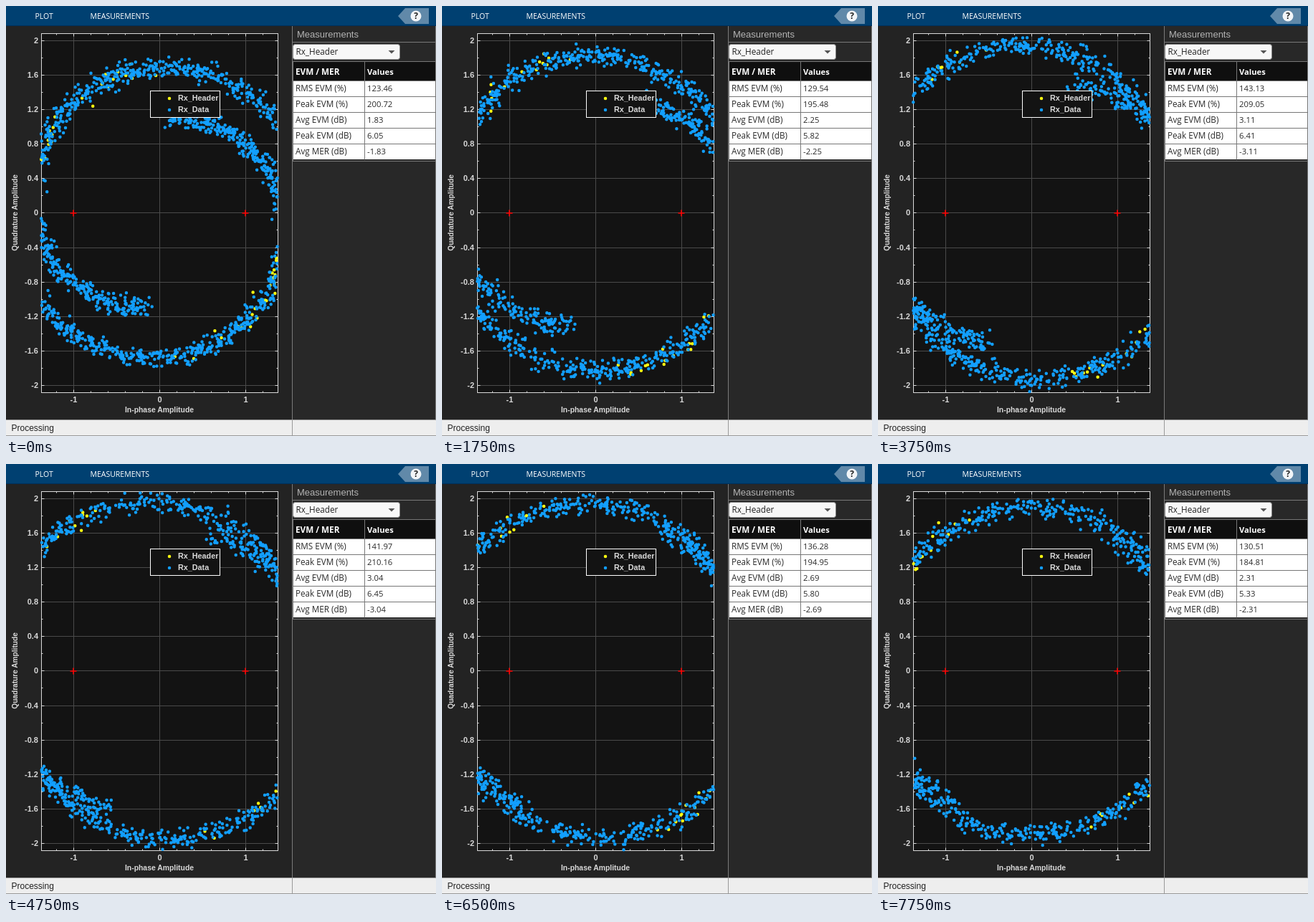
Animation, 600 px wide and 600 px high, one loop 8 s. Source, as an HTML page:

```html
<!DOCTYPE html>
<html lang="en">
<head>
<meta charset="utf-8">
<title>Constellation diagram</title>
<style>
  html, body { margin: 0; width: 100%; height: 100%; overflow: hidden; background: #232323; }
  svg { display: block; width: 100vw; height: 100vh; }
  .ui { font-family: "Open Sans", "Noto Sans", sans-serif; font-size: 11.7px; }
  .axis { font: bold 11px "Liberation Sans", Arial, sans-serif; fill: #d9d9d9; }
  .plain { font-family: "Liberation Sans", Arial, sans-serif; }
  .dots { fill: none; stroke-width: 4.5; stroke-linecap: round; }
</style>
</head>
<body>
<svg viewBox="0 0 600 600" xmlns="http://www.w3.org/2000/svg">
  <rect width="600" height="600" fill="#232323"/>

  <g class="ui" fill="#fff" style="font-size:10.5px">
    <rect width="600" height="28" fill="#004071"/>
    <path d="M0 27.5H600" stroke="#00305a"/>
    <text x="40.5" y="18">PLOT</text>
    <text x="117.5" y="18">MEASUREMENTS</text>
    <path d="M547 14L557 3H590V25H557Z" fill="#6189a9"/>
    <circle cx="572" cy="14" r="7.5" fill="#f2f5f8"/>
    <text x="572" y="18.3" text-anchor="middle" fill="#222" style="font-size:12px;font-weight:bold">?</text>
  </g>

  <rect x="49.5" y="38.5" width="330" height="501" fill="#131313"/>
  <path id="grid" stroke="#4a4a4a" fill="none"/>
  <path id="ticks" stroke="#d9d9d9" fill="none"/>
  <rect x="49.5" y="38.5" width="330" height="501" fill="none" stroke="#d9d9d9"/>
  <g id="labels" class="axis"></g>
  <g class="axis">
    <text x="214" y="567" text-anchor="middle" style="font-size:10.4px">In-phase Amplitude</text>
    <text transform="translate(16 288.5) rotate(-90)" text-anchor="middle" style="font-size:10.15px">Quadrature Amplitude</text>
  </g>
  <path id="head" class="dots" stroke="#ffff11"/>
  <path id="data" class="dots" stroke="#129fff"/>
  <path d="M89.5 289H98.5M94 284.5V293.5M329.5 289H338.5M334 284.5V293.5" stroke="#f00" stroke-width="1.6"/>
  <rect x="201.5" y="118.5" width="97" height="37" fill="#131313" stroke="#fff"/>
  <path class="dots" stroke="#ffff11" d="M228 129h0"/>
  <path class="dots" stroke="#129fff" d="M228 145h0"/>
  <g class="axis" style="font-size:10.8px">
    <text x="240" y="132">Rx_Header</text>
    <text x="240" y="148">Rx_Data</text>
  </g>

  <rect x="400" y="28" width="200" height="549" fill="#282828"/>
  <path d="M399.5 28V577M400 50.5H600" stroke="#7a7a7a"/>
  <g class="ui">
    <text class="plain" x="406" y="44" fill="#b4b4b4" style="font-size:13px">Measurements</text>
    <rect x="400.5" y="53.5" width="149" height="21" rx="3" fill="#f7f7f7" stroke="#8a8a8a"/>
    <text x="404.5" y="68" fill="#222">Rx_Header</text>
    <path d="M533.5 62H542.5L538 66.5Z" fill="#555"/>
    <rect x="400" y="77" width="200" height="137" fill="#fff"/>
    <rect x="401" y="78" width="198" height="26" fill="#0f0f0f"/>
    <path d="M500.5 78V104" stroke="#777"/>
    <g fill="#fff" font-weight="bold">
      <text x="404" y="96">EVM / MER</text>
      <text x="504" y="96" style="font-size:11.2px">Values</text>
    </g>
    <g id="table" fill="#2a2a2a"></g>
    <path d="M400.5 77V216M400 77.5H600M400 216.5H600M599.5 28V577" stroke="#777" fill="none"/>
    <rect y="577" width="600" height="23" fill="#eee"/>
    <path d="M0 577.5H600M399.5 577V600M0 599.5H600" stroke="#999"/>
    <text class="plain" x="7.5" y="593" fill="#222" style="font-size:12px">Processing</text>
  </g>
</svg>
<script>
const LOOP = 8000, STEP = 250;
const $ = id => document.getElementById(id);
const px = x => 214 + 120 * x;
const py = y => 288.9 - 120.3 * y;

// Key readings: time in ms, RMS and peak error in percent.
const keys = [
  [0, 123.46, 200.72], [1750, 129.54, 195.48], [2750, 136.25, 202.37],
  [3750, 143.13, 209.05], [5750, 138.97, 207.04], [7000, 134.15, 186.57],
  [7750, 130.51, 184.81]
];

// Smooth curve through column c of the key readings.
function reading(c, t) {
  const last = keys.length - 1;
  const slope = i => {
    const a = keys[Math.max(0, i - 1)], b = keys[Math.min(last, i + 1)];
    return (b[c] - a[c]) / (b[0] - a[0]);
  };
  let i = 0;
  while (i < last - 1 && t >= keys[i + 1][0]) i++;
  const a = keys[i], b = keys[i + 1], h = b[0] - a[0];
  const k = (t - a[0]) / h, j = 1 - k;
  return a[c] * j * j * (1 + 2 * k) + b[c] * k * k * (1 + 2 * j) +
    h * k * j * (slope(i) * j - slope(i + 1) * k);
}

// Radius of the spiral at a clockwise angle; s is the loop progress.
function radius(deg, s) {
  const u = (deg - 10) / 230;
  const inner = 1.1 + 0.64 * Math.sin(Math.PI * s / 2);
  const outer = 1.75 + 0.15 * s ** 3;
  const bulge = 0.14 - 0.1 * s + 0.22 * Math.sin(Math.PI * s);
  return inner + (outer - inner) * u + bulge * Math.sin(Math.PI * u);
}

function random(seed) {
  return () => {
    seed = (seed + 0x6D2B79F5) | 0;
    let n = Math.imul(seed ^ (seed >>> 15), 1 | seed);
    n = (n + Math.imul(n ^ (n >>> 7), 61 | n)) ^ n;
    return ((n ^ (n >>> 14)) >>> 0) / 4294967296;
  };
}

// Noisy points along the spiral, every other one flipped through the centre.
function scatter(rnd, s, from, to, density) {
  const noise = () => (rnd() + rnd() + rnd() + rnd() - 2) * 0.097;
  const count = 2 * (to - from) * density;
  let d = "";
  for (let i = 0; i < count; i++) {
    const deg = from + (to - from) * rnd();
    const a = deg * Math.PI / 180, r = radius(deg, s), side = i % 2 ? 1 : -1;
    const x = side * (r * Math.sin(a) + noise());
    const y = side * (r * Math.cos(a) + noise());
    if (Math.abs(x) < 1.375 && Math.abs(y) < 2.08)
      d += `M${px(x).toFixed(1)} ${py(y).toFixed(1)}h0`;
  }
  return d;
}

function label(x, y, anchor, s) {
  return `<text x="${x}" y="${y}" text-anchor="${anchor}">${s}</text>`;
}

function buildAxes() {
  let grid = "", ticks = "", text = "";
  const crisp = v => Math.floor(v) + 0.5;
  for (let i = -10; i <= 10; i++) {
    const y = crisp(py(i / 5)), major = i % 2 === 0, n = major ? 4 : 2;
    ticks += `M49.5 ${y}h${n}M379.5 ${y}h${-n}`;
    if (major) {
      grid += `M50 ${y}H379`;
      text += label(45, y + 3.7, "end", +(i / 5).toFixed(1));
    }
  }
  for (let i = -6; i <= 6; i++) {
    const x = crisp(px(i / 5)), major = i % 5 === 0, n = major ? 4 : 2;
    ticks += `M${x} 38.5v${n}M${x} 539.5v${-n}`;
    if (major) {
      grid += `M${x} 39V539`;
      text += label(x, 553, "middle", i / 5);
    }
  }
  $("grid").setAttribute("d", grid);
  $("ticks").setAttribute("d", ticks);
  $("labels").innerHTML = text;
}

function buildTable() {
  const names = ["RMS EVM (%)", "Peak EVM (%)", "Avg EVM (dB)", "Peak EVM (dB)", "Avg MER (dB)"];
  $("table").innerHTML = names.map((s, i) => {
    const y = 104.5 + 22 * i;
    return `<path d="M401 ${y}H599M500.5 ${y}v22" stroke="#777" fill="none"/>` +
      `<text x="404" y="${y + 14.5}">${s}</text>` +
      `<text class="val" x="504" y="${y + 14.5}" style="font-size:11.3px"></text>`;
  }).join("");
  return [...document.querySelectorAll(".val")];
}

function draw(frame) {
  const t = frame * STEP, s = t / LOOP, rnd = random(frame * 7919 + 31);
  $("head").setAttribute("d", scatter(rnd, s, 88, 175 - 18 * s, 0.4));
  $("data").setAttribute("d", scatter(rnd, s, 7 + 24 * s, 240, 3.6 - 0.8 * s));

  const dB = v => 20 * Math.log10(v / 100);
  const rms = reading(1, t), peak = reading(2, t);
  [rms, peak, dB(rms), dB(peak), -dB(rms)].forEach((v, i) => cells[i].textContent = v.toFixed(2));
}

buildAxes();
const cells = buildTable();
const t0 = performance.now();
let shown = -1;
function tick() {
  const frame = Math.floor(((performance.now() - t0) % LOOP) / STEP);
  if (frame !== shown) draw(shown = frame);
  requestAnimationFrame(tick);
}
tick();
</script>
</body>
</html>
```
